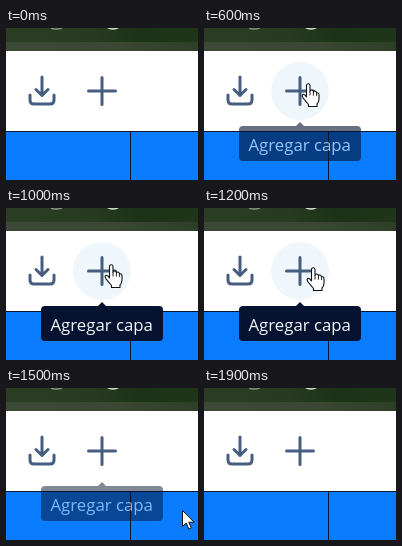
Write an HTML page that moves like this. It is 192 by 152 pixels and loops after 2000 ms.

```html
<!DOCTYPE html>
<html lang="es">
<head>
<meta charset="utf-8">
<title>Agregar capa</title>
<style>
  html, body { margin: 0; width: 100%; height: 100%; overflow: hidden; background: #fff; }
  svg { display: block; width: 100%; height: 100%; }
  text { font: 16.8px "Open Sans", "Noto Sans", sans-serif; fill: #f4f6fb; }
  .icon { fill: none; stroke: #475d80; stroke-width: 3; stroke-linecap: round; stroke-linejoin: round; }
</style>
</head>
<body>
<svg viewBox="0 0 192 152">
  <defs>
    <linearGradient id="forest">
      <stop offset="0" stop-color="#2b3e25"/>
      <stop offset=".45" stop-color="#263b20"/>
      <stop offset=".7" stop-color="#1c3216"/>
      <stop offset="1" stop-color="#203619"/>
    </linearGradient>
    <linearGradient id="strip">
      <stop offset="0" stop-color="#3c4937"/>
      <stop offset=".6" stop-color="#394733"/>
      <stop offset="1" stop-color="#2e3f28"/>
    </linearGradient>
  </defs>

  <rect width="192" height="152" fill="#fff"/>
  <rect width="192" height="15" fill="url(#forest)"/>
  <rect y="14" width="192" height="9" fill="url(#strip)"/>
  <path d="M45 0Q49 2 56 0" fill="none" stroke="#8b9587" stroke-width="1.5"/>
  <circle cx="107" cy="-9" r="10" fill="#53634e" stroke="#dfe4dc" stroke-width="1.6"/>

  <rect y="103" width="192" height="49" fill="#0a7cff"/>
  <path d="M0 103.5H192M124.5 103V152" stroke="#07152f" stroke-width="1"/>

  <circle id="hover" cx="96" cy="63" r="29" fill="#eff7fd"/>
  <g class="icon">
    <path d="M36 49V67M30 61.5L36 67.5L42 61.5M24 67V72Q24 76 28 76H44Q48 76 48 72V67"/>
    <path d="M82.5 63H109.5M96 49.5V76.5"/>
  </g>

  <g id="tip">
    <path d="M91 99L96 94L101 99Z" fill="#051330"/>
    <rect x="35" y="98" width="122" height="35" rx="4" fill="#051330"/>
    <text x="44.5" y="123">Agregar capa</text>
  </g>

  <g id="hand" fill="#fff" stroke="#111" stroke-width="1.1" stroke-linejoin="round">
    <path d="M5.5 14V2.5Q5.5 .7 7.2 .7T9 2.5V8.2Q9.2 7 10.7 7T12.4 8.8Q12.7 7.8 14 8T15.6 10Q18 9.2 18 12V16Q18 19 16 21V23.5H7.5V21.5L2 14.8Q.2 12 2 11.3Q3.5 10.8 5.5 14Z"/>
    <path d="M9 8V12.5M12.4 8.8V12.7M15.6 10V13" fill="none" stroke-width=".9"/>
  </g>
  <path id="arrow" d="M.5 .5V16.5L4.2 13L6.8 19L9.3 17.9L6.8 12.2H12Z" fill="#fff" stroke="#111" stroke-width="1" stroke-linejoin="round"/>
</svg>
<script>
  const LOOP = 2000, STEP = 100, FIRST = 4;
  // pointer kind, x, y, hover opacity, tooltip opacity
  const poses = [
    ["hand", 111, 63, 0, 0],
    ["hand", 102, 58, .6, 0],
    ["hand", 97, 55, 1, .6],
    ["hand", 96, 54, 1, 1],
    ["hand", 96, 54, 1, 1],
    ["hand", 97, 55, 1, 1],
    ["hand", 98, 56, 1, 1],
    ["hand", 100, 57, 1, 1],
    ["hand", 102, 59, 1, 1],
    ["arrow", 131, 78, .4, 1],
    ["arrow", 157, 98, 0, 1],
    ["arrow", 176, 122, 0, .5]
  ];
  const rest = ["", 0, 0, 0, 0];
  const part = id => document.getElementById(id);
  const hover = part("hover"), tip = part("tip");
  const pointers = [part("hand"), part("arrow")];

  function draw(time) {
    const step = Math.floor(time % LOOP / STEP);
    const [kind, x, y, glow, label] = poses[step - FIRST] || rest;
    hover.setAttribute("opacity", glow);
    tip.setAttribute("opacity", label);
    for (const p of pointers) {
      p.setAttribute("visibility", p.id === kind ? "visible" : "hidden");
      p.setAttribute("transform", `translate(${x} ${y})`);
    }
  }

  const start = performance.now();
  function tick() {
    draw(performance.now() - start);
    requestAnimationFrame(tick);
  }
  tick();
</script>
</body>
</html>
```
